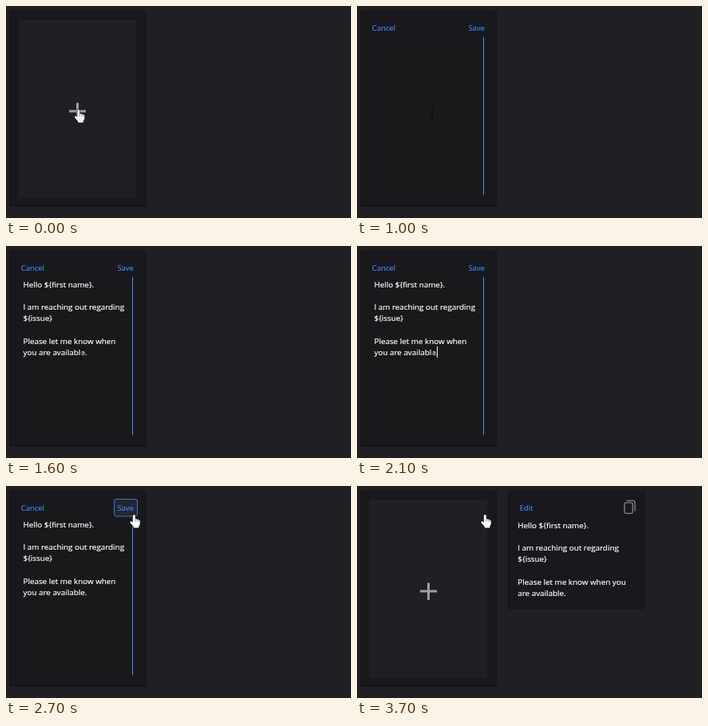
An HTML page with a canvas for the animation above (5300 ms loop, 432x266 px).

```html
<!DOCTYPE html>
<html lang="en">
<head>
<meta charset="utf-8">
<title>Message template editor</title>
<style>
  html, body { margin: 0; width: 100%; height: 100%; overflow: hidden; background: #202024; }
  canvas { display: block; width: 432px; height: 266px; }
</style>
</head>
<body>
<canvas id="stage"></canvas>
<script>
const W = 432, H = 266, LOOP = 5300;
const BLUE = '#3f84fa', PAGE = '#202024', CARD = '#19191d';
const FONT = '"Open Sans", "Noto Sans", sans-serif';
const LINE = 14.2;

const canvas = document.getElementById('stage');
const scale = window.devicePixelRatio || 1;
canvas.width = W * scale;
canvas.height = H * scale;
const ctx = canvas.getContext('2d');

const draft = ['Hello ${first name}.', '', 'I am reaching out regarding', '${issue}', '',
  'Please let me know when', 'you are available.'];
const saved = [...draft.slice(0, 5), 'Please let me know when you', 'are available.'];

const hand = new Path2D('M4 1.5Q5.5-.5 7 1.5V6Q8.3 5 9.5 6.5Q10.7 5.6 11.5 7.2Q13 6.6 13 8.5V12Q12.6 14 11.5 15V17H5V15.5L.8 10.6Q0 8.5 2 8.6L4 10Z');
const knuckles = new Path2D('M7 6V9M9.4 6.6V9M11.4 7.3V9.4');
const arrow = new Path2D('M0 0V11.6L2.7 9L4.6 13.3L6.5 12.5L4.7 8.3H8.2Z');

const clamp = v => Math.max(0, Math.min(1, v));
const ease = v => v * v * (3 - 2 * v);

function rect(x, y, w, h, color) {
  ctx.fillStyle = color;
  ctx.fillRect(x, y, w, h);
}

function roundBox(x, y, w, h, r, fill, stroke, width = 1) {
  ctx.beginPath();
  ctx.roundRect(x, y, w, h, r);
  if (fill) { ctx.fillStyle = fill; ctx.fill(); }
  if (stroke) { ctx.strokeStyle = stroke; ctx.lineWidth = width; ctx.stroke(); }
}

// A hairline outline gives the letters a little more weight.
function text(str, x, y, size, color) {
  ctx.font = `${size}px ${FONT}`;
  ctx.fillStyle = ctx.strokeStyle = color;
  ctx.lineWidth = .2;
  ctx.lineJoin = 'round';
  ctx.fillText(str, x, y);
  ctx.strokeText(str, x, y);
}

function paragraph(lines, x, y) {
  lines.forEach((line, i) => text(line, x, Math.round(y + i * LINE), 9.85, '#fff'));
}

function card(x, y, w, h) {
  roundBox(x + .5, y + .5, w - 1, h - 1, 2, CARD, '#131315');
}

function at(x, y, draw) {
  ctx.save();
  ctx.translate(x, y);
  draw();
  ctx.restore();
}

function drawHand(x, y) {
  at(x, y, () => {
    ctx.lineJoin = 'round';
    ctx.strokeStyle = '#111';
    ctx.lineWidth = 1.4;
    ctx.stroke(hand);
    ctx.fillStyle = '#fff';
    ctx.fill(hand);
    ctx.lineWidth = .5;
    ctx.stroke(knuckles);
  });
}

function drawArrow(x, y) {
  at(x, y, () => {
    ctx.strokeStyle = '#111';
    ctx.lineWidth = 1.2;
    ctx.stroke(arrow);
    ctx.fillStyle = '#fff';
    ctx.fill(arrow);
  });
}

function drawBeam(x, y) {
  rect(x - .5, y - 7, 1.2, 14, '#0b0b0c');
  rect(x - 2, y - 7, 4, 1, '#0f0f10');
  rect(x - 2, y + 6, 4, 1, '#0f0f10');
}

function addPanel() {
  card(4, 6, 171, 246);
  rect(15.5, 17, 147.5, 223.5, PAGE);
  rect(88, 121.5, 3, 21.5, '#a29da6');
  rect(79, 130.5, 21, 3, '#a29da6');
}

function editor(t) {
  card(4, 6, 171, 246);
  rect(20, 39, 138, 198.5, '#19191b');
  rect(158, 39, 1, 198.5, '#4b8cf0');

  const hover = clamp((t - 2450) / 200);
  if (hover) {
    ctx.globalAlpha = hover;
    roundBox(135.5, 16.5, 29, 21.5, 3.5, '#25262c', '#4070c4', 1.1);
    ctx.globalAlpha = 1;
  }
  text('Cancel', 18.8, 31, 9.4, BLUE);
  text('Save', 139.4, 31, 9.4, BLUE);

  const pasted = t >= 1100;
  if (pasted) paragraph(draft, 21.5, 51.6);

  // The caret blinks every half second and restarts on paste.
  const since = t - (pasted ? 1100 : 500);
  const caretOn = Math.floor(since / 500) % 2 === 0 && t < 2600;
  if (caretOn) {
    if (pasted) rect(100, 126, 1, 14, '#f2f2f2');
    else rect(21, 40, 1, 15, '#f2f2f2');
  }

  if (t < 2500) {
    const p = ease(clamp((t - 2150) / 400));
    drawBeam(94 + 66 * p, 136 - 98 * p);
  } else {
    drawHand(154.8, 35.6);
  }
}

function copyIcon() {
  roundBox(335, 20.8, 10.2, 13.5, 1.8, null, '#85858a', 1.3);
  ctx.beginPath();
  ctx.moveTo(337.7, 18.4);
  ctx.lineTo(345.5, 18.4);
  ctx.quadraticCurveTo(348, 18.4, 348, 21);
  ctx.lineTo(348, 31.5);
  ctx.stroke();
}

function savedCard() {
  card(189, 6, 171, 148.5);
  text('Edit', 203.8, 31, 9.4, BLUE);
  copyIcon();
  paragraph(saved, 201.3, 52.6);
}

function draw(t) {
  ctx.setTransform(scale, 0, 0, scale, 0, 0);
  rect(0, 0, W, H, PAGE);
  if (t < 500) {
    addPanel();
    drawHand(85.3, 129.3);
  } else if (t < 3100) {
    editor(t);
  } else {
    addPanel();
    savedCard();
    if (t < 3200) drawArrow(155, 35.5);
    else drawHand(154.8, 35.6);
  }
}

const start = performance.now();
function tick() {
  draw((performance.now() - start) % LOOP);
  requestAnimationFrame(tick);
}
tick();
</script>
</body>
</html>
```
